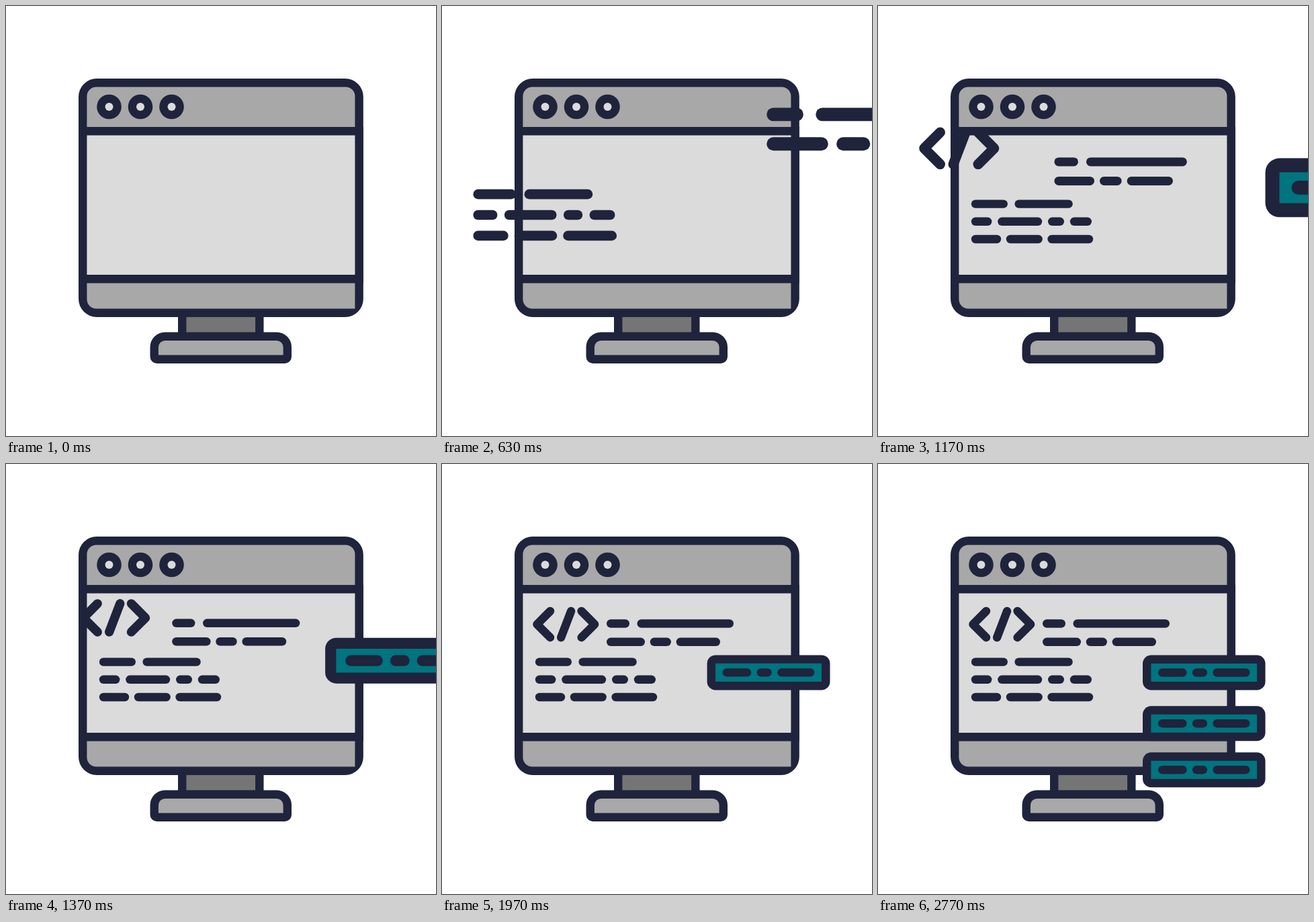
Write an HTML page with a canvas that moves like this. It is 640 px wide and 640 px high and loops after 4.81 s.

```html
<!DOCTYPE html>
<html lang="en">
<head>
<meta charset="utf-8">
<title>Coding on a computer</title>
<style>
  html, body { margin: 0; width: 100%; height: 100%; overflow: hidden; background: #fff; }
  canvas { display: block; width: 100vmin; height: 100vmin; }
</style>
</head>
<body>
<canvas id="stage"></canvas>
<script>
const SIZE = 640, LOOP = 4810;
const NAVY = '#1f233c', GREY = '#a8a8a8', LIGHT = '#dbdbdb', DARK = '#757575', TEAL = '#00747f';
const LINE = 12.4;

const canvas = document.getElementById('stage');
const ctx = canvas.getContext('2d');

// Material-style curve: cubic-bezier(.4, 0, .2, 1)
function ease(u) {
  if (u <= 0) return 0;
  if (u >= 1) return 1;
  let lo = 0, hi = 1;
  for (let i = 0; i < 24; i++) {
    const s = (lo + hi) / 2, r = 1 - s;
    if (1.2 * s * r * r + 0.6 * s * s * r + s * s * s < u) lo = s; else hi = s;
  }
  return lo * lo * (3 - 2 * lo);
}
const progress = (t, start, span) => ease((t - start) / span);

function box(color, x, y, w, h, radii = 0) {
  ctx.fillStyle = color;
  ctx.beginPath();
  ctx.roundRect(x, y, w, h, radii);
  ctx.fill();
}

const dot = (color, x, y, r) => box(color, x - r, y - r, 2 * r, 2 * r, r);

// A navy shape with a lighter core, inset by one line width.
function framed(color, x, y, w, h, outer, inner) {
  box(NAVY, x, y, w, h, outer);
  box(color, x + LINE, y + LINE, w - 2 * LINE, h - 2 * LINE, inner);
}

function dashes(x, y, gap, ...widths) {
  for (const w of widths) {
    box(NAVY, x, y - LINE / 2, w, LINE, LINE / 2);
    x += w + gap;
  }
}

function stroke(...points) {
  ctx.beginPath();
  for (const [x, y] of points) ctx.lineTo(x, y);
  ctx.stroke();
}

function monitor() {
  framed(DARK, 256, 445, 127.5, 70);
  framed(GREY, 214.5, 485.5, 210.5, 46.5, [22, 22, 10, 10], [10, 10, 0, 0]);
  framed(GREY, 108, 108, 423.8, 355, 27, [14, 14, 0, 14]);
  framed(LIGHT, 108, 180, 423.8, 232.4);
  for (let x = 153.5; x < 250; x += 46.5) {
    dot(NAVY, x, 150, 18.3);
    dot(LIGHT, x, 150, 6);
  }
}

function lowerCode() {
  const x = 138.8, y = 320.8, step = 26.2;
  dashes(x, y - step, 10.4, 54.2, 86.4);
  dashes(x, y, 8.8, 30.6, 66, 24, 32.2);
  dashes(x, y + step, 7.6, 44.4, 54, 67.8);
}

function upperCode() {
  dashes(245, 237.5, 11.5, 34, 143.5);
  dashes(245, 264.8, 7.7, 57, 31.2, 65.4);
}

function tag() {
  const x = 184.3, y = 238.6, h = 19.6;
  ctx.strokeStyle = NAVY;
  ctx.lineWidth = LINE;
  ctx.lineCap = ctx.lineJoin = 'round';
  stroke([x + 7.8, y - h], [x - 7.2, y + h]);
  for (const side of [-1, 1]) {
    const inner = x + side * 23.3;
    stroke([inner, y - h], [inner + side * h, y], [inner, y + h]);
  }
}

function server() {
  framed(TEAL, 394, 284.6, 182.5, 51.9, 12.5, 0);
  dashes(417, 310.5, 8.4, 42.5, 22.1, 55);
}

// Each part starts off stage at double size and settles around (x, y).
const parts = [
  { draw: lowerCode, start: 20, span: 1130, x: 229.5, y: 320.8, dx: -429, dy: -55 },
  { draw: upperCode, start: 242, span: 1255, x: 339.5, y: 251.2, dx: 488, dy: -112 },
  { draw: tag, start: 539, span: 1240, x: 184.3, y: 238.6, dx: -299, dy: -126 },
  { draw: server, start: 833, span: 1215, x: 485.2, y: 310.5, dx: 355, dy: -58 }
];

function flyIn({ draw, start, span, x, y, dx, dy }, t) {
  const k = 1 - progress(t, start, span);
  if (k === 1) return;
  ctx.save();
  ctx.translate(x + dx * k, y + dy * k);
  ctx.scale(1 + k, 1 + k);
  ctx.translate(-x, -y);
  draw();
  ctx.restore();
}

// Copies slide out one after the other, each from behind the one above.
function stack(t) {
  const second = 75.7 * progress(t, 2145, 280);
  const third = second + 69 * progress(t, 2500, 270);
  for (const drop of [third, second]) {
    if (!drop) continue;
    ctx.save();
    ctx.translate(0, drop);
    server();
    ctx.restore();
  }
}

function render(t) {
  box('#fff', 0, 0, SIZE, SIZE);
  monitor();
  stack(t);
  for (const part of parts) flyIn(part, t);
}

function resize() {
  const px = Math.round(Math.min(innerWidth, innerHeight) * (devicePixelRatio || 1)) || SIZE;
  canvas.width = canvas.height = px;
  ctx.setTransform(px / SIZE, 0, 0, px / SIZE, 0, 0);
}

const began = performance.now();
function tick() {
  render((performance.now() - began) % LOOP);
  requestAnimationFrame(tick);
}

addEventListener('resize', resize);
resize();
tick();
</script>
</body>
</html>
```
